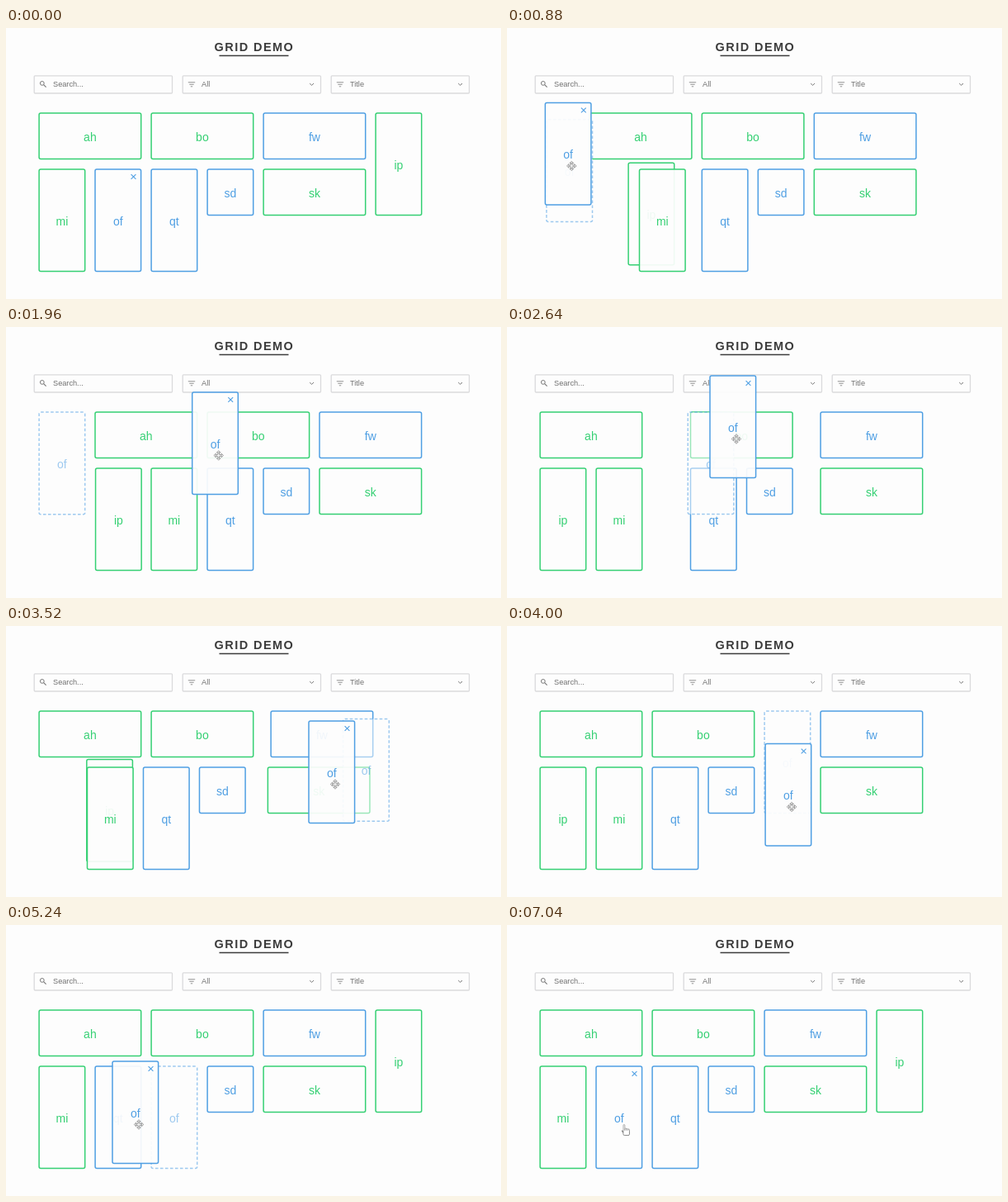
Write an HTML page with a canvas that moves like this. It is 600 px wide and 328 px high and loops after 7.72 s.

```html
<!DOCTYPE html>
<html lang="en">
<head>
<meta charset="utf-8">
<title>Grid demo</title>
<style>
  html, body { margin: 0; width: 600px; height: 328px; overflow: hidden; background: #fdfdfd; }
  body { position: relative; font-family: "Liberation Sans", Arial, sans-serif; }
  h1, span { position: absolute; margin: 0; white-space: nowrap; }
  h1 { left: 252.5px; top: 14px; font-size: 14.5px; line-height: 18px; letter-spacing: 1.45px; color: #3c3c3c; }
  span { top: 62px; font-size: 9.2px; line-height: 13px; color: #707070; }
  canvas { position: absolute; left: 0; top: 0; width: 600px; height: 328px; }
</style>
</head>
<body>
<h1>GRID DEMO</h1>
<span style="left:57px">Search...</span>
<span style="left:237px">All</span>
<span style="left:417px">Title</span>
<canvas id="stage"></canvas>
<script>
const LOOP = 7720, STEP = 40, GRAB = 320, DROP = 6360, HAND = 6640;
const CELL = 68, GAP = 12.4, COLS = 7, LEFT = 40.1, TOP = 103, DURATION = 400;
const GREEN = '#35d073', BLUE = '#4f9fe3';

const canvas = document.getElementById('stage');
const ctx = canvas.getContext('2d');
const ratio = Math.max(1, window.devicePixelRatio || 1);
canvas.width = 600 * ratio;
canvas.height = 328 * ratio;

const card = (name, w, h, color) => ({ name, w, h, color });
const cards = [
  card('ah', 2, 1, GREEN), card('bo', 2, 1, GREEN), card('fw', 2, 1, BLUE),
  card('ip', 1, 2, GREEN), card('mi', 1, 2, GREEN), card('of', 1, 2, BLUE),
  card('qt', 1, 2, BLUE), card('sd', 1, 1, BLUE), card('sk', 2, 1, GREEN)
];
const active = cards[5];
const others = cards.filter(c => c !== active);

// Time of each reorder and the new index of the dragged card
const moves = [
  [640, 0], [1252, 4], [1580, 0], [1980, 2], [2480, 1], [2760, 2],
  [3290, 3], [3469, 8], [3600, 2], [4212, 7], [4660, 6], [5290, 5]
];

// Turning points of the drag: time, x, y of the card's corner
const path = [
  [GRAB, 108, 171], [860, 46, 90], [1252, 88, 150], [1520, 40, 120],
  [2200, 300, 62], [2640, 246, 59], [3160, 335, 74], [3520, 367, 115],
  [4480, 226, 161], [5240, 129, 165], [5700, 97, 153], [DROP, 108, 171]
];

// First-fit packing into the column grid
function pack(index) {
  const order = others.slice();
  order.splice(index, 0, active);
  const taken = new Set(), slots = {};
  for (const c of order) {
    place: for (let row = 0; ; row++) {
      for (let col = 0; col + c.w <= COLS; col++) {
        const cells = [];
        for (let i = 0; i < c.w; i++)
          for (let j = 0; j < c.h; j++) cells.push((row + j) * COLS + col + i);
        if (cells.some(k => taken.has(k))) continue;
        cells.forEach(k => taken.add(k));
        slots[c.name] = [LEFT + col * CELL, TOP + row * CELL];
        break place;
      }
    }
  }
  return slots;
}

const home = pack(5);
const layouts = moves.map(([time, index]) => ({ time, slots: pack(index) }));

// cubic-bezier(.25, .1, .25, 1)
function ease(x) {
  if (x <= 0) return 0;
  if (x >= 1) return 1;
  let lo = 0, hi = 1, s = 0.5;
  for (let i = 0; i < 24; i++) {
    s = (lo + hi) / 2;
    if (0.75 * s * (1 - s) + s * s * s < x) lo = s; else hi = s;
  }
  return 0.3 * s * (1 - s) ** 2 + 3 * s * s * (1 - s) + s ** 3;
}

// A card only restarts its glide when its own slot changes
function slotAt(name, t) {
  let from = home[name], to = from, start = 0;
  const at = time => {
    const p = ease((time - start) / DURATION);
    return from.map((v, d) => v + (to[d] - v) * p);
  };
  for (const { time, slots } of layouts) {
    if (time > t) break;
    const next = slots[name];
    if (next[0] === to[0] && next[1] === to[1]) continue;
    from = at(time);
    to = next;
    start = time;
  }
  return at(t);
}

// Slope at a path point; zero where the motion turns back
function slope(k, d) {
  const a = path[k - 1], b = path[k], c = path[k + 1];
  if (!a || !c || (b[d] - a[d]) * (c[d] - b[d]) <= 0) return 0;
  return (c[d] - a[d]) / (c[0] - a[0]);
}

function dragAt(t) {
  let i = 0;
  while (i < path.length - 2 && path[i + 1][0] <= t) i++;
  const a = path[i], b = path[i + 1], span = b[0] - a[0];
  const u = Math.min(1, Math.max(0, (t - a[0]) / span)), v = 1 - u;
  return [1, 2].map(d =>
    a[d] * (1 + 2 * u) * v * v + b[d] * u * u * (3 - 2 * u) +
    span * u * v * (slope(i, d) * v - slope(i + 1, d) * u));
}

function line(points, color, width, fill) {
  ctx.beginPath();
  points.forEach(([x, y]) => ctx.lineTo(x, y));
  if (fill) { ctx.closePath(); ctx.fillStyle = fill; ctx.fill(); }
  ctx.strokeStyle = color;
  ctx.lineWidth = width;
  ctx.stroke();
}

function box(x, y, w, h, r, color, width, fill) {
  ctx.beginPath();
  ctx.roundRect(x, y, w, h, r);
  if (fill) { ctx.fillStyle = fill; ctx.fill(); }
  ctx.strokeStyle = color;
  ctx.lineWidth = width;
  ctx.stroke();
}

function drawCard(c, [x, y], ghost) {
  const w = c.w * CELL - GAP, h = c.h * CELL - GAP;
  ctx.save();
  if (ghost) {
    ctx.globalAlpha = 0.55;
    ctx.setLineDash([3.6, 2.4]);
  }
  box(x, y, w, h, 2, c.color, 1.5, 'rgba(253,253,253,.93)');
  ctx.fillStyle = c.color;
  ctx.font = '14px "Liberation Sans", Arial, sans-serif';
  ctx.textAlign = 'center';
  ctx.fillText(c.name, x + w / 2, y + h / 2 + 6);
  ctx.restore();
  if (c === active && !ghost) {
    const cx = x + 46.5, cy = y + 9, r = 2.9;
    for (const s of [r, -r]) line([[cx - r, cy - s], [cx + r, cy + s]], c.color, 1.1);
  }
}

function drawHeader() {
  line([[258.5, 33.5], [342.5, 33.5]], '#3c3c3c', 1.5);
  for (const x of [34, 214, 394]) {
    box(x + 0.2, 57.8, 167.3, 21.2, 1, '#dadadc', 1.3);
    if (x === 34) {
      ctx.beginPath();
      ctx.arc(43.8, 66.9, 2.4, 0, Math.PI * 2);
      ctx.strokeStyle = '#777';
      ctx.lineWidth = 1;
      ctx.stroke();
      line([[45.6, 68.7], [48.6, 71.7]], '#777', 1.2);
      continue;
    }
    for (let i = 0; i < 3; i++) {
      const r = 4.2 - 1.5 * i, y = 65.8 + 2.5 * i;
      line([[x + 11 - r, y], [x + 11 + r, y]], '#888', 0.9);
    }
    line([[x + 154.2, 67], [x + 156.6, 69.4], [x + 159, 67]], '#777', 1);
  }
}

function drawMove(x, y) {
  ctx.save();
  ctx.translate(x, y);
  for (let i = 0; i < 4; i++) {
    line([[0, -5.8], [2.3, -3.4], [-2.3, -3.4]], '#777', 0.7, '#fff');
    line([[-0.9, -3.2], [-0.9, -0.9], [-3.2, -0.9]], '#777', 0.7);
    ctx.rotate(Math.PI / 2);
  }
  ctx.restore();
}

function drawHand(x, y) {
  ctx.save();
  ctx.translate(x, y);
  line([[3, 9.5], [0.5, 7.6], [3.6, 12]], '#666', 0.8, '#fff');
  box(2.4, 6.5, 7.4, 6.8, 1.5, '#666', 0.8, '#fff');
  for (let i = 0; i < 4; i++)
    box(2.4 + 1.85 * i, i ? 4.4 + 0.4 * i : 0.3, 1.85, i ? 4 : 8, 0.9, '#777', 0.6, '#fff');
  ctx.fillRect(3, 7.4, 6.2, 4.6);
  ctx.restore();
}

function draw(t) {
  ctx.setTransform(ratio, 0, 0, ratio, 0, 0);
  ctx.clearRect(0, 0, 600, 328);
  drawHeader();
  for (const c of others) drawCard(c, slotAt(c.name, t));
  if (t >= GRAB && t < DROP) drawCard(active, slotAt('of', t), true);
  const [x, y] = dragAt(t);
  drawCard(active, [x, y]);
  if (t >= HAND) drawHand(138.6, 241.3);
  else if (t >= GRAB) drawMove(x + 32, y + 76.5);
}

const begin = performance.now();
function tick() {
  const t = (performance.now() - begin) % LOOP;
  draw(Math.floor(t / STEP) * STEP);
  requestAnimationFrame(tick);
}
tick();
</script>
</body>
</html>
```
